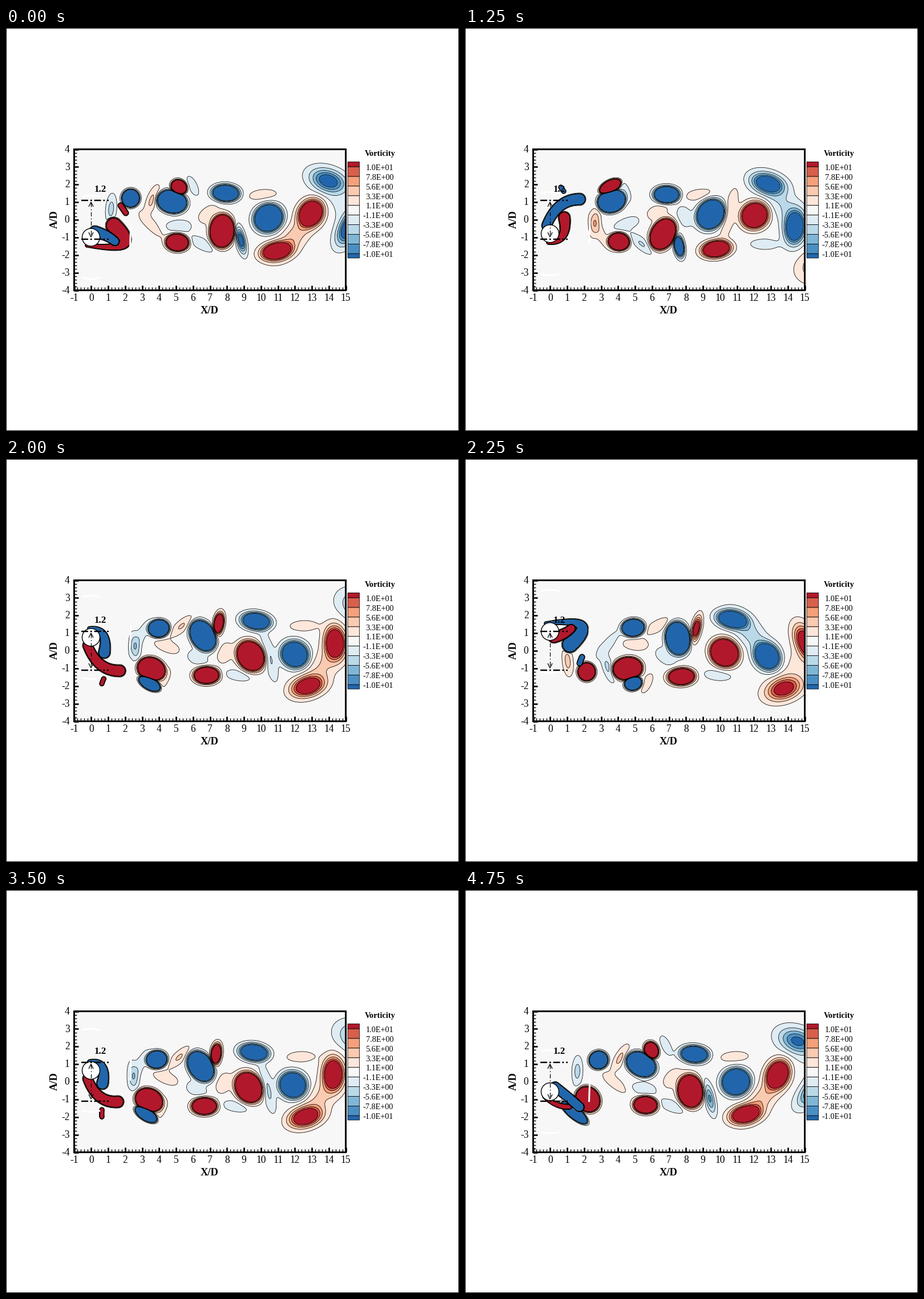
Recreate the animation shown at these times as a matplotlib script. Size 794 by 706 pixels, loop 5000 ms.

```python
import numpy as np
import matplotlib.pyplot as plt
from matplotlib.animation import FuncAnimation
from matplotlib.patches import Circle, Rectangle

W, H, DPI = 794, 706, 64
PT = 72 / DPI                      # points per pixel
FRAMES, INTERVAL = 20, 250
STEP = 0.163                       # oscillation periods per frame
X0, Y0, SX, SY = 149, 335.5, 29.75, 30.9

LEVELS = [-10, -7.8, -5.6, -3.3, -1.1, 1.1, 3.3, 5.6, 7.8, 10]
COLORS = ["#2166ac", "#4a8fc3", "#7fb6d6", "#b9d9e9", "#dfecf4", "#f7f7f7",
          "#fde6da", "#facab1", "#f4a07a", "#d75f4c", "#b2182b"]

plt.rcParams["font.family"] = "Liberation Serif"
fig = plt.figure(figsize=(W / DPI, H / DPI), dpi=DPI, facecolor="white")
ax = fig.add_axes([0, 0, 1, 1])
ax.set_xlim(0, W)
ax.set_ylim(H, 0)
ax.axis("off")

gx, gy = np.meshgrid(np.linspace(119, 595, 477), np.linspace(212, 459, 248))
GX, GY = (gx - X0) / SX, (Y0 - gy) / SY
NEAR = 150                         # columns that hold the attached layers


# Each rule gives x, y, outer half axes, angle and peak at age t (periods).
def major(t):
    return (3.62 + 6.3 * t - .45 * t * t,
            .3 + .75 * np.cos(np.pi * t / 2),
            1 + .2 * np.sin(np.pi * t / 1.4) + .6 * (t / 2) ** 4,
            .78 + .27 * np.sin(np.pi * t / 2.6) ** 2,
            15 - 145 * t,
            500 * np.exp(-1.55 * t))


def single(t):
    return (1.35 + 5.3 * t + .22 * t * t, 1.2 + .21 * t * t,
            .55 + .45 * t, .62 + .2 * (t / 2) ** 4,
            12 - 13 * t, 480 * np.exp(-1.65 * t))


def minor(t):
    return (3.55 + 9.2 * t - 2.2 * t * t, 1.87 + .1 * t - 1.65 * t * t,
            .55 + 1.2 * abs(t - .22), .38 + .15 * np.exp(-((t - .25) / .2) ** 2),
            -33 - 72 * np.tanh((t - .2) / .17), 2 + 600 * np.exp(-5.8 * t))


def upper_sheet(t):
    return (2.65 + 5 * t + 1.1 * t * t, .4 + np.tanh((t - .07) / .12),
            .9, .33, 52 - 52 * np.tanh(1.8 * (t - .35)),
            3.2 - 1.1 * np.tanh(4 * (t - .6)))


def lower_sheet(t):
    return (2.95 + 3.3 * t, -.75 + 2.7 * t - 1.55 * t * t,
            1 - .25 * t, .28 + .1 * t, -60 + 85 * t, 2.4)


def link(t):
    return (2.3 + 5.72 * t, 2 - .58 * t, 1.75, .76, -48,
            5 * np.exp(-((t - 1.75) / .4) ** 2))


def halo(t):
    return 4.4 + 8.6 * t, 1.65 + 1.4 * t, .6, .26, -63, 2.4


# sign, first age, last age, rule
TRACKS = [(-1, -.25, 2.4, major), (-1, .1, 2.6, single),
          (1, -.25, 1.12, minor), (1, -.39, 1.65, upper_sheet),
          (1, -.06, 1.65, lower_sheet), (-1, 1.55, 2.3, link),
          (-1, -.2, .36, halo)]

# attached layers by stage: sign, curve points in pixels, end widths
STAGES = {
    0: [(-1, (143, 346), (162, 300), (201, 300), 9, 11),
        (1, (146, 376), (181, 376), (174, 332), 3, 11),
        (-1, (168, 279), (170, 282), (173, 286), 4, 4)],
    .185: [(1, (142, 381), (246, 394), (189, 346), 3, 15),
           (-1, (156, 357), (177, 362), (191, 374), 11, 8),
           (1, (201, 311), (205, 317), (210, 324), 5, 5)],
    .28: [(1, (140, 362), (158, 380), (182, 380), 4, 5),
          (-1, (158, 345), (180, 362), (200, 380), 9, 9)],
}


def body_y(p):
    return -1.1 * np.cos(2 * np.pi * (p - .12))


def blob(x, y, a, b, ang, peak):
    c, s = np.cos(np.radians(ang)), np.sin(np.radians(ang))
    dx, dy = GX - x, GY - y
    r2 = ((dx * c + dy * s) / a) ** 2 + ((dy * c - dx * s) / b) ** 2
    return peak * np.exp(-max(np.log(peak / 1.1), .8) * r2)


def wake(q):
    """Sum of all vortices; every half period sheds a mirrored set."""
    f = np.zeros_like(GX)
    for sign, first, last, rule in TRACKS:
        for k in range(-1, 6):
            age = q + k / 2
            if first <= age <= last:
                x, y, a, b, ang, peak = rule(age)
                m = (-1) ** k
                f += sign * m * blob(x, m * y, a, b, m * ang, peak)
    return f


def ribbon(q, ref, start, mid, end, w0, w1):
    t = np.linspace(0, 1, 50)
    px, py = ((1 - t) ** 2 * s + 2 * t * (1 - t) * m + t * t * e
              for s, m, e in zip(start, mid, end))
    px = px + t * 5 * SX * (q - ref)
    py = py - (1 - t) * SY * (body_y(q) - body_y(ref))
    x, y = gx[:, :NEAR], gy[:, :NEAR]
    r2 = np.full(x.shape, 1e9)
    for cx, cy, r in zip(px, py, w0 + (w1 - w0) * t):
        r2 = np.minimum(r2, ((x - cx) ** 2 + (y - cy) ** 2) / r ** 2)
    return 2000 * np.exp(-np.log(2000 / 1.1) * r2)


def field(p):
    q = (p + .06) % .5 - .06
    f = wake(q)
    ref = min(STAGES, key=lambda s: abs(s - q))
    near = f[:, :NEAR]
    for sign, *curve in STAGES[ref]:
        r = ribbon(q, ref, *curve)
        near[:] = np.where(r > 1.1, sign * r, near + sign * r)
    odd = round((p - q) * 2) % 2
    return -f[::-1] if odd else f


def line(xs, ys, w, color="black", z=6, **kw):
    return ax.plot(xs, ys, color=color, lw=w * PT, zorder=z,
                   solid_capstyle="butt", **kw)[0]


def label(x, y, s, size, ha="center", **kw):
    ax.text(x, y, s, fontsize=size * PT, ha=ha, va="center", zorder=8, **kw)


def box(x, y, w, h, lw, fc="none"):
    ax.add_patch(Rectangle((x, y), w, h, fc=fc, ec="black", lw=lw * PT,
                           zorder=7, snap=False))


def draw_axes():
    box(.5, .5, W - 1, H - 1, 1)
    box(119.5, 212.5, 476, 247, 3)
    for i in range(81):
        x, n = 119.5 + i * SX / 5, 4 if i % 5 else 7
        line([x, x], [459, 458 - n], 1.4 if i % 5 else 2.6)
        if i % 5 == 0:
            label(x, 474, str(i // 5 - 1), 17.5)
    for i in range(41):
        y, n = 459.5 - i * 247 / 40, 4 if i % 5 else 7
        line([119, 120 + n], [y, y], 1.4 if i % 5 else 2.6)
        if i % 5 == 0:
            label(111.5, y + .7, str(i // 5 - 4), 17.5, "right")
    label(357, 495, "X/D", 18.5, weight="bold")
    label(85, 335, "A/D", 18.5, weight="bold", rotation=90)


def draw_legend():
    label(656, 220.7, "Vorticity", 14.2, weight="bold")
    edges = [234.5] + [243.2 + 16.9 * i for i in range(10)] + [403]
    for top, low, c in zip(edges, edges[1:], COLORS[::-1]):
        box(599, top, 20.5, low - top, .8, c)
    for i, v in enumerate(LEVELS[::-1]):
        label(679, 245.2 + 16.95 * i, f"{v:.1E}", 14.2, "right")


def draw_marks():
    for y in (301.5, 369.5):
        line([132, 180], [y, y], 2.4, dashes=(5, 1.6, 1.2, 1.6))
    line([149, 149], [306, 365], 1.2, dashes=(6, 3, 1.5, 3))
    for tip, d in ((305, 8), (366, -8)):
        line([145, 149, 153], [tip + d, tip, tip + d], 1.3)
    label(165, 283, "1.2", 17, weight="bold")


draw_axes()
draw_legend()
draw_marks()
body = Circle((X0, Y0), 15.5, fc="white", ec="black", lw=1.4 * PT, zorder=4)
ax.add_patch(body)
gap_top, gap_low, gap_side = (line([], [], 3, "white", 3) for _ in range(3))
ARC = np.linspace(-16, 16, 17)
BOW = (ARC / 16) ** 2 * 2.5
sets = []


def update(n):
    while sets:
        sets.pop().remove()
    p = (n - 5) * STEP
    f = np.clip(field(p), -400, 400)
    sets.append(ax.contourf(gx, gy, f, LEVELS, colors=COLORS, extend="both",
                            zorder=1))
    sets.append(ax.contour(gx, gy, f, LEVELS, colors="black",
                           linewidths=.75 * PT, linestyles="solid", zorder=2))
    cy = Y0 - SY * body_y(p)
    body.center = (X0, cy)
    gap_top.set_data(X0 + ARC, cy - 73 + BOW)
    gap_low.set_data(X0 + ARC, cy + 73 - BOW)
    gap_side.set_data([219, 218, 217.5], [cy - 22, cy, cy + 18])
    return []


anim = FuncAnimation(fig, update, frames=FRAMES, interval=INTERVAL,
                     init_func=lambda: [], repeat=True, repeat_delay=0)
plt.show()
```
